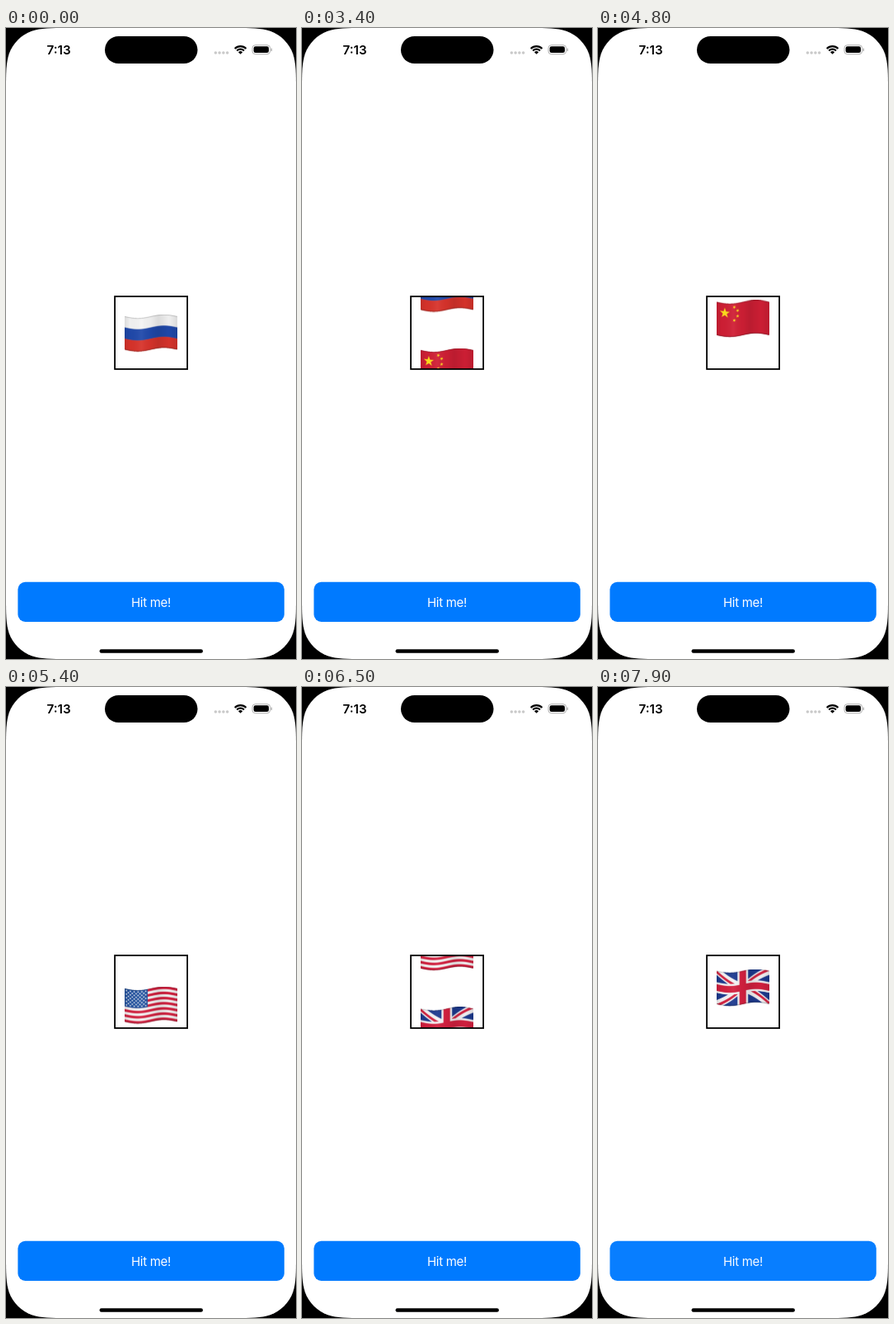
An HTML page with a canvas for the animation above (8 s loop, 352 by 764 pixels).

```html
<!DOCTYPE html>
<html lang="en">
<head>
<meta charset="utf-8">
<title>Flag slider</title>
<style>
  html, body { margin: 0; width: 352px; height: 764px; overflow: hidden; background: #000; }
  canvas { position: absolute; left: 0; top: 0; }
  span {
    position: absolute; width: 120px; text-align: center; line-height: 24px;
    font-family: Inter, Roboto, sans-serif; white-space: nowrap;
  }
  #clock { left: 4px; top: 14.5px; font-size: 15.2px; font-weight: 600; color: #000; }
  #label { left: 116px; top: 683.5px; font-size: 15px; letter-spacing: -0.02em; color: #fff; }
</style>
</head>
<body>
<canvas id="stage" width="352" height="764"></canvas>
<span id="clock">7:13</span>
<span id="label">Hit me!</span>
<script>
const LOOP = 8000, SLIDE = 1500, HOLD = 35, FADE = 400, STEP = 89;
const TAPS = [2615, 4340, 5710, 7640];
const FLAG = { x: 144, y: 347, w: 63.5, h: 40.2, wave: 2.2, zoom: 4 };
const ctx = document.getElementById('stage').getContext('2d');
const label = document.getElementById('label');
ctx.imageSmoothingQuality = 'high';

function rect(c, color, x, y, w, h, r = 0) {
  c.fillStyle = color;
  c.beginPath();
  c.roundRect(x, y, w, h, r);
  c.fill();
}

function line(c, color, width, x1, y1, x2, y2) {
  c.strokeStyle = color;
  c.lineWidth = width;
  c.beginPath();
  c.moveTo(x1, y1);
  c.lineTo(x2, y2);
  c.stroke();
}

function star(c, color, x, y, r, turn = 0) {
  c.fillStyle = color;
  c.beginPath();
  for (let i = 0; i < 10; i++) {
    const a = turn - Math.PI / 2 + i * Math.PI / 5;
    const d = i % 2 ? r * 0.39 : r;
    c.lineTo(x + d * Math.cos(a), y + d * Math.sin(a));
  }
  c.fill();
}

// Flat flag designs, drawn in a w by h field

function russia(c, w, h) {
  ['#f4f4f4', '#2049ab', '#d8332b'].forEach((color, i) => rect(c, color, 0, i * h / 3, w, h / 3 + 0.1));
}

function china(c, w, h) {
  rect(c, '#d01f35', 0, 0, w, h);
  star(c, '#ffdf1c', 10, 11.7, 6.4);
  [[21.5, 4.6], [25.5, 9.2], [25.5, 15.8], [21.5, 20.4]].forEach(([x, y]) =>
    star(c, '#ffdf1c', x, y, 2.2, Math.atan2(11.7 - y, 10 - x) + Math.PI / 2));
}

function usa(c, w, h) {
  const s = h / 13;
  rect(c, '#f5f3f3', 0, 0, w, h);
  for (let i = 0; i < 13; i += 2) rect(c, '#d3203f', 0, i * s, w, s);
  rect(c, '#24539f', 0, 0, 28, s * 7);
  for (let row = 0; row < 9; row++)
    for (let col = row % 2; col < 11; col += 2)
      star(c, '#fff', (col + 1) * 28 / 12, (row + 1) * s * 0.7, 1.35);
}

function uk(c, w, h) {
  const cx = w / 2, cy = h / 2;
  rect(c, '#1d3a8f', 0, 0, w, h);
  line(c, '#f5f4f5', 8.4, 0, 0, w, h);
  line(c, '#f5f4f5', 8.4, 0, h, w, 0);
  for (let i = 0; i < 4; i++) {
    const x = i & 1 ? w : 0, y = i & 2 ? h : 0;
    const shift = x ? -1.4 : 1.4;
    line(c, '#d3203f', 2.8, x, y + shift, cx, cy + shift);
  }
  rect(c, '#f5f4f5', cx - 6.4, 0, 12.8, h);
  rect(c, '#f5f4f5', 0, cy - 6.4, w, 12.8);
  rect(c, '#d3203f', cx - 4, 0, 8, h);
  rect(c, '#d3203f', 0, cy - 4, w, 8);
}

function makeCanvas(w, h) {
  const el = document.createElement('canvas');
  el.width = w;
  el.height = h;
  return [el, el.getContext('2d')];
}

function shade(c, w, h) {
  const g = c.createLinearGradient(0, 0, w, 0);
  [[0, 0, 0.1], [0.1, 0, 0.02], [0.32, 255, 0.06], [0.5, 0, 0.03], [0.64, 0, 0.1], [0.85, 0, 0.02], [1, 0, 0.1]]
    .forEach(([at, v, a]) => g.addColorStop(at, `rgba(${v},${v},${v},${a})`));
  rect(c, g, 0, 0, w, h);
  rect(c, 'rgba(0,0,0,.2)', 0, 0, w, 0.9);
  rect(c, 'rgba(0,0,0,.25)', 0, h - 1.1, w, 1.1);
}

// Bend a flat flag by shifting its columns along a sine
function makeFlag(design) {
  const { w, h, wave, zoom } = FLAG;
  const W = w * zoom, H = Math.round(h * zoom);
  const [flat, fc] = makeCanvas(W, H);
  fc.scale(zoom, zoom);
  fc.beginPath();
  fc.roundRect(0, 0, w, h, 0.9);
  fc.clip();
  design(fc, w, h);
  shade(fc, w, h);
  const [bent, bc] = makeCanvas(W, Math.ceil((h + 2 * wave + 1) * zoom));
  for (let x = 0; x < W; x++) {
    const y = wave * (1 + Math.sin(2 * Math.PI * x / W)) * zoom;
    bc.drawImage(flat, x, 0, 1, H, x, y, 1, H);
  }
  return bent;
}

const flags = [russia, china, usa, uk].map(makeFlag);

// cubic-bezier(.42, 0, .58, 1)
function ease(t) {
  if (t <= 0) return 0;
  if (t >= 1) return 1;
  let lo = 0, hi = 1, s;
  for (let i = 0; i < 24; i++) {
    s = (lo + hi) / 2;
    const r = 1 - s;
    if (3 * r * r * s * 0.42 + 3 * r * s * s * 0.58 + s * s * s < t) lo = s; else hi = s;
  }
  return s * s * (3 - 2 * s);
}

function screen() {
  const w = 352, h = 764, r = 49.3;
  const k = [1.52866, 1.08849, 0.86841, 0.63149, 0.37282, 0.16906, 0.07491].map(v => v * r);
  const curve = [
    [k[1], 0, k[2], 0, k[3], k[6]],
    [k[4], k[5], k[5], k[4], k[6], k[3]],
    [0, k[2], 0, k[1], 0, k[0]]
  ];
  ctx.fillStyle = '#000';
  ctx.fillRect(0, 0, w, h);
  ctx.fillStyle = '#fff';
  ctx.fillRect(k[0], 0, w - 2 * k[0], h);
  ctx.fillRect(0, k[0], w, h - 2 * k[0]);
  for (let i = 0; i < 4; i++) {
    ctx.save();
    if (i & 1) { ctx.translate(w, 0); ctx.scale(-1, 1); }
    if (i & 2) { ctx.translate(0, h); ctx.scale(1, -1); }
    ctx.beginPath();
    ctx.moveTo(k[0], 0);
    curve.forEach(p => ctx.bezierCurveTo(...p));
    ctx.lineTo(0, k[0] + 1);
    ctx.lineTo(k[0] + 1, k[0] + 1);
    ctx.lineTo(k[0] + 1, 0);
    ctx.fill();
    ctx.restore();
  }
}

function wifi(x, y) {
  const a = Math.PI * 0.25;
  ctx.strokeStyle = ctx.fillStyle = '#000';
  ctx.lineWidth = 2.2;
  [9.7, 6.2].forEach(r => {
    ctx.beginPath();
    ctx.arc(x, y, r, -Math.PI / 2 - a, -Math.PI / 2 + a);
    ctx.stroke();
  });
  ctx.beginPath();
  ctx.moveTo(x, y);
  ctx.arc(x, y, 3.7, -Math.PI / 2 - a, -Math.PI / 2 + a);
  ctx.fill();
}

function statusBar() {
  rect(ctx, '#000', 120, 10, 112.5, 33, 16.5);
  for (let i = 0; i < 4; i++) rect(ctx, '#c9c9c9', 252.6 + i * 4.75, 28.2, 3.6, 3.6, 1.8);
  wifi(284.6, 31.8);
  ctx.strokeStyle = '#a6a6a6';
  ctx.lineWidth = 0.9;
  ctx.beginPath();
  ctx.roundRect(299, 20.7, 21.6, 11, 3.6);
  ctx.stroke();
  rect(ctx, '#000', 300.6, 22.3, 18.4, 7.8, 2.3);
  rect(ctx, '#a6a6a6', 321.7, 24.4, 1.2, 3.6, 0.7);
}

function slider(t) {
  const moved = TAPS.map(s => ease((t - s) / SLIDE));
  const total = moved.reduce((a, b) => a + b, 0);
  ctx.save();
  ctx.beginPath();
  ctx.rect(132, 325, 88, 88);
  ctx.clip();
  flags.forEach((flag, i) => {
    const y = (i - total) * STEP;
    if (Math.abs(y) < STEP)
      ctx.drawImage(flag, FLAG.x, FLAG.y + y, FLAG.w, flag.height / FLAG.zoom);
  });
  ctx.restore();
  ctx.strokeStyle = '#000';
  ctx.lineWidth = 1.8;
  ctx.strokeRect(132.1, 325, 88, 88);
}

function dimming(t) {
  return Math.max(...TAPS.map(s => {
    if (t < s - HOLD || t > s + FADE) return 0;
    return t < s ? 1 : (1 - (t - s) / FADE) ** 2;
  }));
}

function button(t) {
  const alpha = 1 - 0.25 * dimming(t);
  ctx.globalAlpha = alpha;
  rect(ctx, '#007aff', 14.4, 670.8, 323.4, 48.2, 9);
  ctx.globalAlpha = 1;
  label.style.opacity = alpha;
}

function draw(now) {
  const t = now % LOOP;
  screen();
  statusBar();
  slider(t);
  button(t);
  rect(ctx, '#000', 113.5, 752.3, 125.5, 4.5, 2.25);
}

function tick() {
  draw(performance.now());
  requestAnimationFrame(tick);
}
tick();
</script>
</body>
</html>
```
